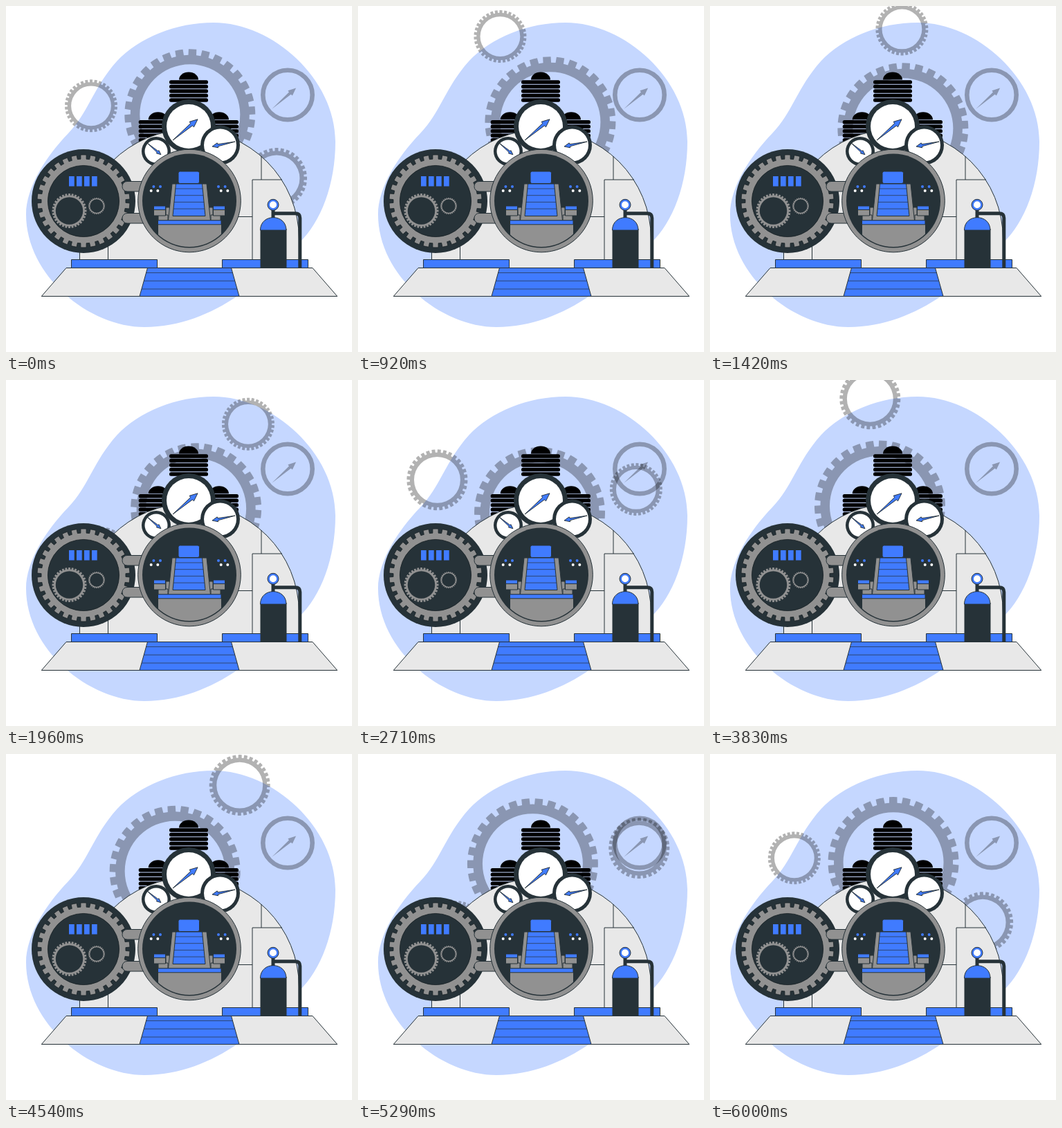
An HTML page with a canvas for the animation above (6040 ms loop, 500 by 500 pixels).

```html
<!DOCTYPE html>
<html lang="en">
<head>
<meta charset="utf-8">
<title>Machine with orbiting gears</title>
<style>
html, body { margin: 0; width: 100%; height: 100%; overflow: hidden; background: #fff; }
canvas { display: block; width: 500px; height: 500px; }
</style>
</head>
<body>
<canvas id="stage" width="500" height="500"></canvas>
<script>
const ctx = document.getElementById('stage').getContext('2d');
const BLUE = '#407bff', DARK = '#263238', GRAY = '#919191', LIGHT = '#e8e8e8';
const SHADE = 'rgba(0,0,0,0.3)';
const TAU = Math.PI * 2;
const LOOP = 6040, STEPS = 145;
const PIVOT = { x: 261.3, y: 174 };
const MID = 265;

// Paint a path; the outline is optional
function paint(path, fill, stroke, width = 1) {
  if (fill) {
    ctx.fillStyle = fill;
    ctx.fill(path, 'evenodd');
  }
  if (stroke) {
    ctx.strokeStyle = stroke;
    ctx.lineWidth = width;
    ctx.stroke(path);
  }
}

function disc(x, y, r, fill, stroke) {
  const p = new Path2D();
  p.arc(x, y, r, 0, TAU);
  paint(p, fill, stroke);
}

function box(x, y, w, h, fill, stroke, r = 0) {
  const p = new Path2D();
  p.roundRect(x, y, w, h, r);
  paint(p, fill, stroke);
}

// Upright trapezoid given by half widths, with optional cross lines
function trapezoid(x, top, bottom, a, b, fill, rows = []) {
  const p = new Path2D();
  p.moveTo(x - a, top);
  p.lineTo(x + a, top);
  p.lineTo(x + b, bottom);
  p.lineTo(x - b, bottom);
  p.closePath();
  paint(p, fill, DARK);
  const seams = new Path2D();
  for (const y of rows) {
    const half = a + (b - a) * (y - top) / (bottom - top);
    seams.moveTo(x - half, y);
    seams.lineTo(x + half, y);
  }
  paint(seams, null, DARK, 0.7);
}

const steps = (from, gap, count) => Array.from({ length: count }, (_, i) => from + i * gap);

// Toothed ring; root and hole are shares of the tip radius
function gear(x, y, tip, teeth, fill, { root = 0.9, hole = 0.76, turn = 0, stroke } = {}) {
  const p = new Path2D(), pitch = TAU / teeth;
  for (let i = 0; i < teeth; i++) {
    const a = turn - TAU / 4 + i * pitch;
    p.arc(x, y, tip, a - pitch * 0.29, a + pitch * 0.29);
    p.arc(x, y, tip * root, a + pitch * 0.32, a + pitch * 0.68);
  }
  p.closePath();
  p.moveTo(x + tip * hole, y);
  p.arc(x, y, tip * hole, 0, TAU);
  paint(p, fill, stroke, 0.8);
}

// Thin wedge with an arrow head
function needle(x, y, length, degrees, fill, stroke) {
  const p = new Path2D();
  p.lineTo(0, 0);
  for (const side of [-1, 1]) {
    const head = [[0.75, 0.045], [0.76, 0.105]];
    if (side > 0) {
      p.lineTo(length, 0);
      head.reverse();
    }
    for (const [u, v] of head) p.lineTo(u * length, side * v * length);
  }
  p.closePath();
  ctx.save();
  ctx.translate(x, y);
  ctx.rotate(degrees * TAU / 360);
  paint(p, fill, stroke, 0.9);
  ctx.restore();
}

function gauge(x, y, r, rim, handX, handY, length, degrees) {
  disc(x, y, r, DARK);
  disc(x, y, r - rim, '#fff');
  needle(handX, handY, length, degrees, BLUE, DARK);
}

function insulator(x, y) {
  const cap = new Path2D();
  cap.ellipse(x, y + 11, 14, 11, 0, Math.PI, TAU);
  paint(cap, '#000');
  for (const top of steps(y + 11.8, 6.5, 5)) box(x - 28, top, 56, 5.4, '#000', null, 2.5);
}

const blob = new Path2D('M300 24C386 24 476 106 476 196C476 258 455 312 424 342' +
  'C380 386 303 464 200 464C120 464 29 390 29 301C29 262 58 217 90 184' +
  'C119 154 126 118 160 80C193 45 246 24 300 24Z');

function orbiters(turn) {
  const c = Math.cos(turn), s = Math.sin(turn);
  const orbit = (x, y, tip, teeth, shape) =>
    gear(PIVOT.x + x * c - y * s, PIVOT.y + x * s + y * c, tip, teeth, SHADE, { turn, ...shape });
  orbit(4.5, -17.2, 94.5, 30, { root: 0.91, hole: 0.767, turn: turn + 0.04 });
  orbit(-138.3, -29.7, 38, 34);
  orbit(129.7, 75, 44, 32);
}

function backGauge() {
  const ring = new Path2D();
  ring.arc(407, 128.5, 35.7, 0, TAU);
  paint(ring, null, SHADE, 6.6);
  needle(384, 149, 46.5, -41, SHADE);
}

function dome() {
  const shell = new Path2D();
  shell.moveTo(106.5, 378.5);
  shell.arc(MID, 337, 158.5, Math.PI, TAU);
  shell.lineTo(423.5, 378.5);
  paint(shell, LIGHT, DARK);
  paint(new Path2D('M369 217V251M399 251H356V367M336 304.5H356M147.5 340V367'), null, DARK);
}

function platform() {
  trapezoid(MID, 378.5, 419.5, 178, 213.7, LIGHT);
  trapezoid(MID, 378.5, 419.5, 60.5, 72, BLUE, steps(385.5, 11.75, 3));
  for (const x of [94.5, 312.5]) box(x, 366.5, 124, 12, BLUE, DARK);
}

function door() {
  disc(112, 282, 75, DARK);
  gear(112, 282, 67, 30, GRAY, { root: 0.91, hole: 0.77, stroke: '#182125' });
  for (const x of steps(91, 11, 4)) box(x, 246, 7.7, 14.5, BLUE);
  gear(91.5, 296, 25, 32, GRAY, { hole: 0.79 });
  gear(131, 289, 12, 26, GRAY, { hole: 0.81 });
  for (const y of [253.5, 299.5]) box(168, y, 38, 14.5, GRAY, DARK, 7);
}

function cabin() {
  disc(MID, 281.5, 74.3, GRAY, DARK);
  disc(MID, 281.5, 68, DARK);
  ctx.save();
  ctx.beginPath();
  ctx.arc(MID, 281.5, 66.5, 0, TAU);
  ctx.clip();
  box(220, 315, 91, 35, GRAY);
  ctx.restore();

  for (const side of [-1, 1]) {
    const part = (d, y, w, h, fill) => box(MID + side * d - w / 2, y, w, h, fill, DARK);
    part(31, 291, 6, 19, GRAY);
    part(38, 302, 14, 8, GRAY);
    part(43, 294, 17, 9, GRAY);
    part(43, 289, 17, 5.5, BLUE);
    for (const d of [-4.8, 4.8]) {
      disc(MID + side * 46.8 + d, 261, 2, BLUE);
      disc(MID + side * 50.5 + d, 267, 2, '#fff');
    }
  }
  trapezoid(MID, 257, 310, 25, 30.5, GRAY);
  trapezoid(MID - 0.5, 257, 303.5, 19, 23.5, BLUE, steps(264, 9.7, 4));
  box(249, 239, 30.5, 17.5, BLUE, DARK, 2.5);
  box(219.5, 309.8, 91.5, 6, BLUE, DARK);
}

function tank() {
  paint(new Path2D('M386 299.8H418Q424.8 299.8 424.8 306.5V378.5'), null, DARK, 5);
  box(383.5, 293, 5, 15, DARK);
  box(367.5, 322, 38, 56.8, DARK);
  paint(new Path2D('M367.5 324C367.5 299.5 405 299.5 405 324Z'), BLUE, DARK);
  disc(386, 287.3, 8, BLUE, DARK);
  disc(386, 287.3, 5, '#fff');
}

function draw(now) {
  // The motion is stepped at 24 pictures per second
  const step = Math.floor((now % LOOP + 5) / LOOP * STEPS) % STEPS;
  ctx.fillStyle = '#fff';
  ctx.fillRect(0, 0, 500, 500);
  paint(blob, '#c5d7ff');
  orbiters(step / STEPS * TAU);
  backGauge();
  insulator(264, 95.5);
  for (const x of [219.7, 308]) insulator(x, 153.3);
  dome();
  platform();
  gauge(217, 210, 21, 4.5, 204, 198, 26, 40);
  gauge(264, 174, 39, 7, 241, 194, 47, -40);
  gauge(309.5, 201, 28.5, 5, 331, 196, 33.7, 168);
  door();
  cabin();
  tank();
}

let start = null;
function tick(now) {
  if (start === null) start = now;
  draw(now - start);
  requestAnimationFrame(tick);
}
draw(0);
requestAnimationFrame(tick);
</script>
</body>
</html>
```
